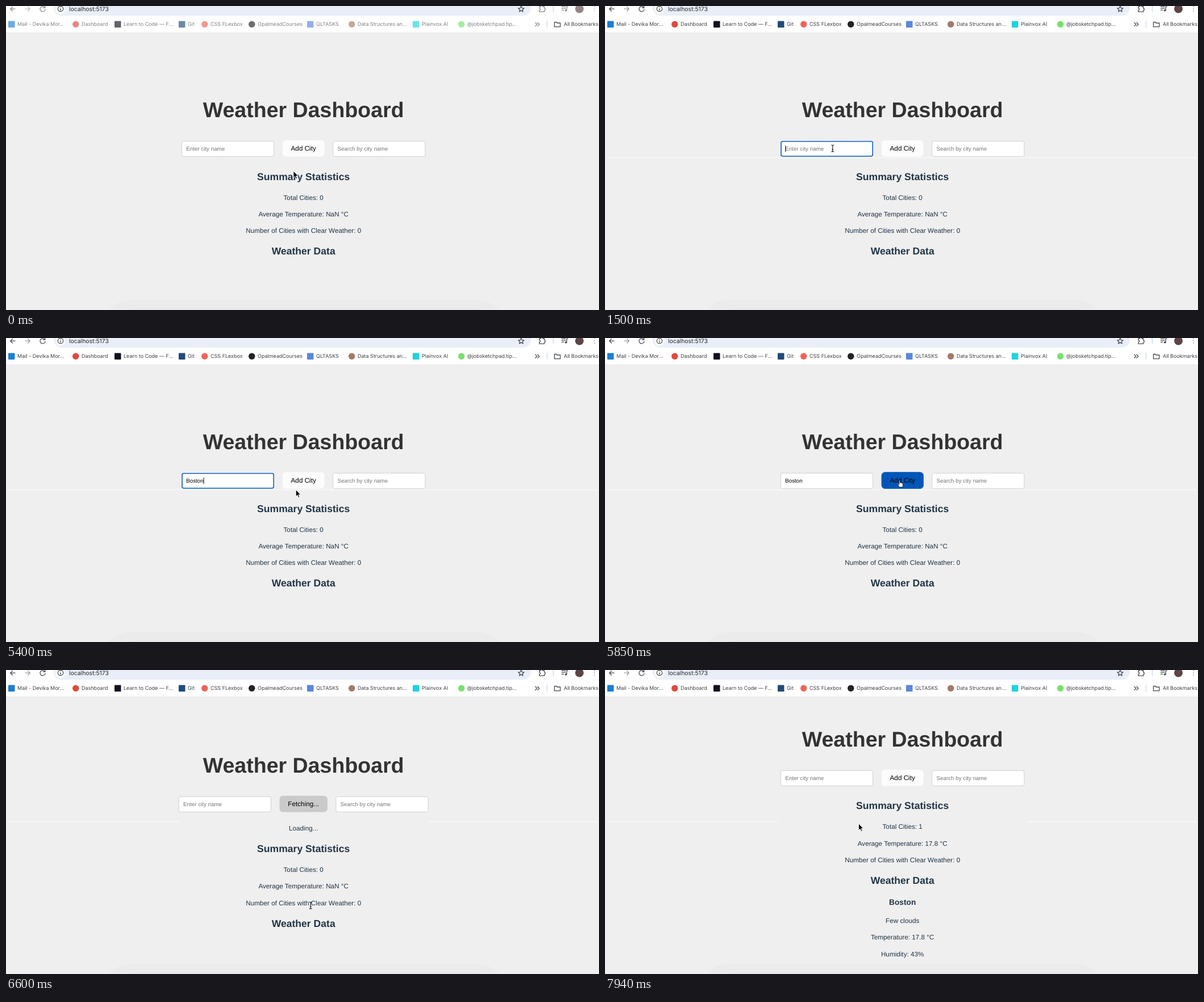
Recreate the animation shown at these times as an HTML page. Size 1044 px wide and 536 px high, loop 8 s.

```html
<!DOCTYPE html>
<html lang="en">
<head>
<meta charset="utf-8">
<title>Weather Dashboard</title>
<style>
  html, body { margin: 0; height: 100%; overflow: hidden; background: #efefef; }
  svg { display: block; width: 100vw; height: 100vh; }
  text {
    font: 11.73px "Liberation Sans", Arial, sans-serif; fill: #213547;
    white-space: pre; text-rendering: geometricPrecision;
  }
  .mid text, text.mid { text-anchor: middle; }
  text.h1 { font-size: 37.55px; font-weight: bold; fill: #333; }
  text.h2 { font-size: 17.6px; font-weight: bold; }
  text.h3 { font-size: 13.72px; font-weight: bold; }
  text.field { font-size: 9.78px; fill: #757575; }
  #bar text { font: 9px Inter, Roboto, sans-serif; fill: #3c3f43; }
  #bar text.url { font-size: 10.4px; fill: #24272b; }
  .box { fill: #fff; stroke: #ccc; stroke-width: .9; }
  .icon { fill: none; stroke: #474a4f; stroke-width: 1.3; stroke-linecap: round; stroke-linejoin: round; }
</style>
</head>
<body>
<svg viewBox="0 0 1044 536">
  <rect width="1044" height="536" fill="#efefef"/>
  <rect x="169" y="518" width="712" height="120" rx="52" fill="#ebebeb"/>
  <path d="M218 536q6-1.2 14-1.2h590q8 0 14 1.2" fill="none" stroke="#e0e0e0"/>
  <path id="seam" stroke="#f4f4f4" stroke-width="3"/>

  <g id="bar">
    <rect width="1044" height="47" fill="#fff"/>
    <path d="M0 47.3H1044" stroke="#e3e4e6" stroke-width=".8"/>
    <rect x="84" y="-12" width="840" height="29" rx="14" fill="#e9eef9"/>
    <circle cx="96" cy="5" r="9" fill="#fff"/>
    <circle class="icon" cx="96" cy="5" r="4.7"/>
    <path class="icon" d="M96 4.8v2.6M96 2.6v.1"/>
    <text class="url" x="111" y="9">localhost:5173</text>
    <path class="icon" d="M907 .2l1.5 3.4 3.6.3-2.8 2.4.9 3.6-3.2-2-3.2 2 .9-3.6-2.8-2.4 3.6-.3z"/>
    <path d="M963.5 0V10M952.5 26V38" stroke="#c6d9f7" stroke-width="1.3"/>
    <path class="icon" d="M965.5 28.5h3.5l1.3 1.5h5.5v6.7h-10.3z"/>
    <text x="982" y="35.4">All Bookmarks</text>
    <g id="fading">
      <path class="icon" d="M16 5.2H8M11.5 1.4L7.7 5.2l3.8 3.8"/>
      <path class="icon" d="M34 5.2h8M38.5 1.4l3.8 3.8-3.8 3.8" opacity=".55"/>
      <path class="icon" d="M68 2.5A4.5 4.5 0 1 0 69 6M68.7 0v3.2h-3.2"/>
      <path class="icon" d="M939 1h2.6a1.7 1.7 0 0 1 3.4 0h2.8v3.2a1.7 1.7 0 0 1 0 3.4v2.6H939V7.4a1.7 1.7 0 0 0 0-3.4z"/>
      <path class="icon" d="M978.5 1.2h6.5M978.5 4.2h6.5M978.5 7.2h3.5M987.2 7.5V1.2h1.8"/>
      <circle cx="985.7" cy="7.7" r="1.8" fill="#474a4f"/>
      <circle cx="1009.5" cy="5" r="7.5" fill="#5d4545"/>
      <path class="icon" d="M1036 1v.1M1036 5v.1M1036 9v.1"/>
      <path class="icon" d="M932 29.2l3 3-3 3M936 29.2l3 3-3 3"/>
    </g>
  </g>

  <g id="form">
    <text class="h1 mid" x="523.7" y="196">Weather Dashboard</text>
    <g id="cityField">
      <rect class="box" x="309.4" y="238.3" width="162.3" height="27" rx="2.8"/>
      <rect id="focusRing" x="310.1" y="238.7" width="161.1" height="26" rx="2.6" fill="none" stroke="#1263c8" stroke-width="1.6"/>
      <text class="field" id="cityText" x="317.3" y="255"></text>
      <rect id="caret" y="246" width=".9" height="11.5"/>
    </g>
    <rect id="button" y="236.7" height="28.8" rx="5.9"/>
    <text class="mid" id="buttonText" x="523.7" y="255" style="fill:#000"></text>
    <g id="searchField">
      <rect class="box" x="575.7" y="238.3" width="162.3" height="27" rx="2.8"/>
      <text class="field" x="583.6" y="255">Search by city name</text>
    </g>
  </g>
  <text class="mid" id="loading" x="523.7" y="283">Loading...</text>
  <g id="stats" class="mid"></g>

  <g id="cursor">
    <path id="arrow" d="M0 0V12l2.7-2.5 1.9 4.2 2-.9-1.9-4.1h3.7z" stroke="#fff" stroke-width=".9"/>
    <path id="beam" d="M-2.5-6Q0-6 0-4.5V4.5Q0 6-2.5 6M2.5-6Q0-6 0-4.5M2.5 6Q0 6 0 4.5M-1.3 2h2.6" fill="none" stroke="#111" stroke-width="1.1"/>
    <path id="hand" d="M-1.6 7L-4.6 2.6Q-4.9 1-3.3 1.4L-2.2 2.6V-4.6Q-1.3-5.8-.4-4.6V-.8Q.6-1.6 1.4-.5 2.4-1.1 3 0 4.2-.4 4.6.9V3.6Q4.6 5.4 3.6 7z" fill="#fff" stroke="#111" stroke-width=".9"/>
  </g>
</svg>

<script>
const LOOP = 8000, STEP = 150, END = 7940;
const $ = id => document.getElementById(id);
const set = (node, attrs) => {
  for (const key in attrs) node.setAttribute(key, attrs[key]);
  return node;
};
const add = (parent, tag, attrs, text = '') => {
  const node = set(document.createElementNS(parent.namespaceURI, tag), attrs);
  node.textContent = text;
  return parent.appendChild(node);
};
const show = (node, on) => set(node, { visibility: on ? 'visible' : 'hidden' });

// label, text x, icon colour, round icon
const bookmarks = [
  ['Mail - Devika Mor...', 20, '#1b7fd3', 0],
  ['Dashboard', 133, '#e2493c', 1],
  ['Learn to Code — F...', 207, '#11111f', 0],
  ['Git', 320, '#214b78', 0],
  ['CSS FLexbox', 360, '#f06456', 1],
  ['OpalmeadCourses', 443, '#222', 1],
  ['QLTASKS', 546, '#5a86de', 0],
  ['Data Structures an...', 619, '#a47a68', 1],
  ['Plainvox AI', 732, '#1fd3e0', 0],
  ['@jobsketchpad.tip...', 812, '#74e36b', 1],
];
for (const [label, x, fill, round] of bookmarks) {
  add($('fading'), 'rect', { x: x - 16, y: 26.5, width: 11.5, height: 11.5, rx: round ? 6 : 1, fill });
  add($('fading'), 'text', { x, y: 35.4 }, label);
}

const line = (y, text, cls = '') => add($('stats'), 'text', { x: 523.7, y, class: cls }, text);
line(306.6, 'Summary Statistics', 'h2');
const total = line(341.5, '');
const average = line(370.8, '');
line(400.2, 'Number of Cities with Clear Weather: 0');
line(438.4, 'Weather Data', 'h2');
const cityLines = [
  line(475, 'Boston', 'h3'),
  line(507.3, 'Few clouds'),
  line(536.6, 'Temperature: 17.8 °C'),
  line(566, 'Humidity: 43%'),
];

// time, x, y, shape
const pointerPath = [
  [0, 506, 291, 'arrow'], [900, 415, 252, 'arrow'], [1050, 405, 251, 'arrow'],
  [1200, 402, 251, 'beam'], [1500, 400.8, 251, 'beam'], [4800, 400.8, 251, 'beam'],
  [4950, 400.5, 250.5, 'beam'], [5100, 400.5, 250.5, 'beam'], [5250, 455, 256, 'beam'],
  [5400, 510.3, 267.5, 'arrow'], [5550, 516, 258, 'hand'], [5850, 520, 256, 'hand'],
  [6000, 520, 257, 'arrow'], [6300, 528, 340, 'arrow'], [6450, 532, 390, 'beam'],
  [6600, 536.3, 415, 'beam'], [6900, 540, 423, 'arrow'], [7200, 541.5, 426, 'arrow'],
  [7500, 515, 370, 'arrow'], [7950, 446.5, 270.8, 'arrow'],
];
const typing = [[0, ''], [2700, 'B'], [3600, 'Bo'], [3750, 'Bos'], [4200, 'Bost'], [4350, 'Boston'], [6000, '']];
const caretSpans = [[1350, 1950], [2550, 3150], [3600, 4800], [5250, 5850]];
const between = (t, [from, to]) => t >= from && t < to;

function drawPointer(t) {
  const i = pointerPath.findLastIndex(key => key[0] <= t);
  const [t0, x0, y0, shape] = pointerPath[i];
  const [t1, x1, y1] = pointerPath[i + 1] || [t0 + 1, x0, y0];
  const k = (t - t0) / (t1 - t0);
  set($('cursor'), { transform: `translate(${x0 + (x1 - x0) * k} ${y0 + (y1 - y0) * k})` });
  for (const id of ['arrow', 'beam', 'hand']) show($(id), id === shape);
}

function drawForm(t, fetching, done) {
  const hovered = between(t, [5550, 6000]);
  const shift = fetching ? 5.2 : 0;
  const typed = typing.findLast(([start]) => start <= t)[1];

  set($('form'), { transform: `translate(0 ${done ? -61 : fetching ? -15 : 0})` });
  set($('cityField'), { transform: `translate(${-shift} 0)` });
  set($('searchField'), { transform: `translate(${shift} 0)` });
  show($('focusRing'), between(t, [1350, 5850]));

  $('cityText').textContent = typed || 'Enter city name';
  $('cityText').style.fill = typed ? '#000' : '';
  const typedWidth = typed ? $('cityText').getComputedTextLength() : 0;
  set($('caret'), { x: 317.3 + typedWidth });
  show($('caret'), caretSpans.some(span => between(t, span)));

  const half = fetching ? 42.2 : 36.8;
  set($('button'), {
    x: 523.8 - half, width: half * 2,
    fill: hovered ? '#0056b8' : fetching ? '#cacaca' : '#fcfcfc',
    stroke: hovered ? '#1766c4' : 'none',
  });
  $('buttonText').textContent = fetching ? 'Fetching...' : 'Add City';
}

function draw(t) {
  const active = t >= 900;
  const fetching = between(t, [6000, 6900]);
  const done = t >= 6900;

  set($('fading'), { opacity: active ? 1 : 0.65 });
  set($('seam'), { d: !active ? '' : t < 6000 ? 'M4 267.5H1041' : 'M4 267.5H305M744 267.5H1041' });
  drawForm(t, fetching, done);

  show($('loading'), fetching);
  set($('stats'), { transform: `translate(0 ${done ? -61.2 : fetching ? 14.7 : 0})` });
  total.textContent = `Total Cities: ${done ? 1 : 0}`;
  average.textContent = `Average Temperature: ${done ? 17.8 : NaN} °C`;
  for (const node of cityLines) show(node, done);
  drawPointer(t);
}

function tick() {
  const t = performance.now() % LOOP;
  draw(t >= END ? 7950 : Math.floor(t / STEP) * STEP);
  requestAnimationFrame(tick);
}
tick();
</script>
</body>
</html>
```
